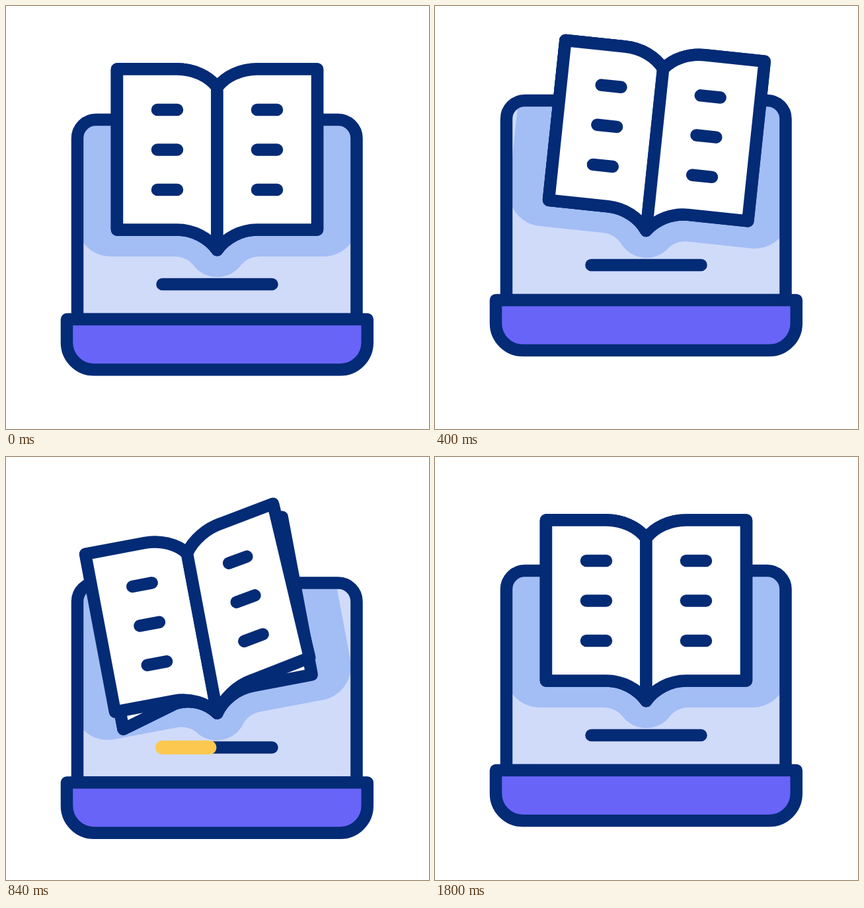
Animation of 640 by 640 pixels, one loop 2040 ms. Source, as an HTML page with a canvas:

```html
<!DOCTYPE html>
<html lang="en">
<head>
<meta charset="utf-8">
<title>Online book</title>
<style>
html, body { margin: 0; width: 100%; height: 100%; overflow: hidden; background: #fff; }
canvas { display: block; width: 640px; height: 640px; }
</style>
</head>
<body>
<canvas id="stage" width="640" height="640"></canvas>
<script>
const ctx = document.getElementById('stage').getContext('2d');
const LOOP = 2040, STEP = 40, LINE = 18.5;
const NAVY = '#032b76', SCREEN = '#d0dbfa', SHADE = '#a3bdf5', BASE = '#6864f8', GOLD = '#fcc850';
const PIVOT = [319.5, 369], HALF = 151.5;

// Eased progress from 0 to 1 between times a and b
const ease = (t, a, b) => {
  const u = Math.min(1, Math.max(0, (t - a) / (b - a)));
  return u * u * (3 - 2 * u);
};

function stroke(path, color = NAVY, width = LINE) {
  ctx.strokeStyle = color;
  ctx.lineWidth = width;
  ctx.stroke(path);
}

function paint(path, fill) {
  ctx.fillStyle = fill;
  ctx.fill(path);
  stroke(path);
}

function line(x1, y1, x2, y2, color, width) {
  const path = new Path2D();
  path.moveTo(x1, y1);
  path.lineTo(x2, y2);
  stroke(path, color, width);
}

const screen = new Path2D('M108 474V200A28 28 0 0 1 136 172H502.5A28 28 0 0 1 530.5 200V474Z');
const base = new Path2D('M92 474H546.8V509A41 41 0 0 1 505.8 550.2H133A41 41 0 0 1 92 509Z');
// Book shadow, relative to the bottom of the spine
const shade = new Path2D('M-213-330V-42A52 52 0 0 0-161 10H-65C-51 10-42 16-36 23' +
  'C-28 34-15 41 0 41S28 34 36 23C42 16 51 10 65 10H161A52 52 0 0 0 213-42V-330Z');

// Page bends: right pages rise, left pages sag toward the outer edge
const flat = (x, y) => [x, y];
const rise = amount => (x, y) => {
  const w = Math.abs(x) / HALF;
  return [
    x + amount * w * w * (0.11 + 0.00177 * y),
    y - amount * w ** 1.2 * (1.02 + 0.0006 * y)
  ];
};
const sag = amount => (x, y) => {
  const w = (x / HALF) ** 2;
  return [x + 0.27 * amount * w, y + amount * w];
};

function page(side, bend) {
  const at = (x, y) => bend(side * x, y);
  const path = new Path2D();
  path.moveTo(0, 0);
  path.bezierCurveTo(...at(13, -18), ...at(36, -30.5), ...at(60.5, -30.5));
  path.lineTo(...at(HALF, -30.5));
  path.lineTo(...at(HALF, -273.5));
  path.lineTo(...at(60.5, -273.5));
  path.bezierCurveTo(...at(36, -273.5), ...at(13, -263), 0, -246);
  path.closePath();
  paint(path, '#fff');
}

function bullets(side, bend) {
  for (const y of [-212, -151.5, -91]) {
    line(...bend(side * 60.5, y), ...bend(side * 90.5, y));
  }
}

function drawBook(t) {
  const lift = rise(45 * (ease(t, 748, 915) - ease(t, 915, 1510)));
  const drop = 48 * ease(t, 690, 960);
  page(-1, sag(drop * (1 - ease(t, 1270, 1780))));
  page(-1, sag(drop * (1 - ease(t, 920, 1760))));
  page(1, flat);
  page(-1, flat);
  page(1, lift);
  bullets(-1, flat);
  bullets(1, lift);
}

function drawBar(t) {
  const x = u => 236.5 + 166 * u;
  const head = ease(t, 605, 1123), tail = ease(t, 940, 1405);
  line(x(0), 421, x(1), 421);
  if (head > tail) line(x(tail), 421, x(head), 421, GOLD, 21);
}

function draw(t) {
  const y = -36 * ease(t, 0, 240) + 61 * ease(t, 330, 665) - 25 * ease(t, 760, 1000);
  const tilt = 6 * ease(t, 0, 345) - 17 * ease(t, 500, 870) + 11 * ease(t, 1060, 1405);
  const inBook = action => {
    ctx.save();
    ctx.translate(...PIVOT);
    ctx.rotate(tilt * Math.PI / 180);
    action();
    ctx.restore();
  };

  ctx.fillStyle = '#fff';
  ctx.fillRect(0, 0, 640, 640);
  ctx.lineCap = ctx.lineJoin = 'round';
  ctx.save();
  ctx.translate(0, y);

  ctx.save();
  ctx.clip(screen);
  ctx.fillStyle = SCREEN;
  ctx.fill(screen);
  inBook(() => {
    ctx.fillStyle = SHADE;
    ctx.fill(shade);
  });
  ctx.restore();

  stroke(screen);
  paint(base, BASE);
  drawBar(t);
  inBook(() => drawBook(t));
  ctx.restore();
}

// The motion advances in steps of 1/25 s
function tick() {
  const t = performance.now() % LOOP;
  draw(Math.floor(t / STEP) * STEP);
  requestAnimationFrame(tick);
}
tick();
</script>
</body>
</html>
```
